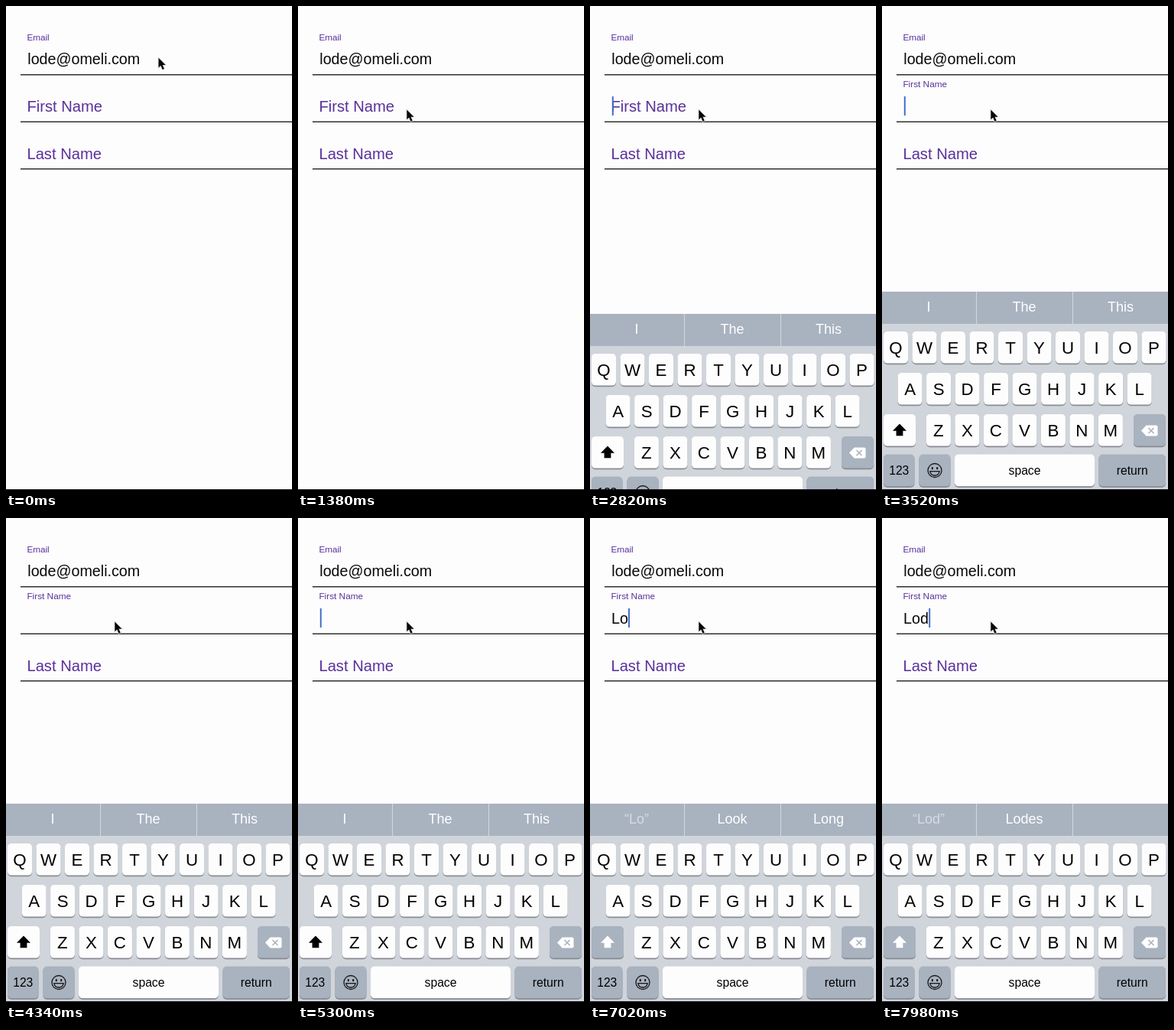
Write an HTML page that moves like this. It is 374 by 632 pixels and loops after 8 s.

```html
<!DOCTYPE html>
<html lang="en">
<head>
<meta charset="utf-8">
<title>Floating label form</title>
<style>
  html, body { margin: 0; width: 100%; height: 100%; overflow: hidden; background: #fdfdfd; }
  svg { display: block; width: 374px; height: 632px; font-family: "Liberation Sans", Arial, sans-serif; }
  .label { fill: #59309a; font-size: 20.2px; }
  .value { fill: #080808; font-size: 19.7px; }
  .rule { fill: #30302e; }
  .letter { font-size: 22.3px; text-anchor: middle; }
  .word { font-size: 15.7px; text-anchor: middle; }
  .hint { font-size: 18px; text-anchor: middle; fill: #fff; }
</style>
</head>
<body>
<svg id="stage" viewBox="0 0 374 632">
  <rect width="374" height="632" fill="#fdfdfd"/>
  <g id="form"></g>
  <text class="value" x="28.3" y="76">lode@omeli.com</text>
  <text class="value" id="typed" x="28" y="138"></text>
  <rect id="caret" y="118" width="2" height="25" fill="#466ecb"/>
  <g id="keyboard">
    <rect y="373" width="374" height="270" fill="#d0d4db"/>
    <rect y="373" width="374" height="42" fill="#a9b2bf"/>
    <path d="M123.5 373v42M249.5 373v42" stroke="#d3d8df"/>
    <g id="hints"></g>
    <g id="keys"></g>
    <path id="arrow" d="M23 545.5l9 9.3h-4.6v6.4h-8.8v-6.4h-4.6z"/>
    <path d="M339 554.5l6.5-7h13q2 0 2 2v10q0 2-2 2h-13z" fill="#fff"/>
    <path d="M348.5 551l7 7m0-7l-7 7" stroke="#a9b2bf" stroke-width="1.6"/>
    <g fill="none" stroke="#161616" stroke-width="1.3">
      <circle cx="69" cy="606.5" r="9"/>
      <path d="M62.8 607.6h12.4q-1 5.4-6.2 5.4t-6.2-5.4z"/>
      <path d="M65.8 603v1.2m6.4-1.2v1.2" stroke-width="2.2" stroke-linecap="round"/>
    </g>
  </g>
  <path id="pointer" d="M0 0v12.6l2.9-2.7 2.2 5.2 2.3-1-2.2-5h4z" fill="#080808"
        stroke="#e6e6e6" stroke-width="1.6" paint-order="stroke"/>
  <rect y="631" width="374" height="1" fill="#0c0c0c"/>
</svg>
<script>
const LOOP = 8000;
const $ = id => document.getElementById(id);

function add(parent, tag, attrs, text = '') {
  const el = document.createElementNS('http://www.w3.org/2000/svg', tag);
  for (const k in attrs) el.setAttribute(k, attrs[k]);
  el.textContent = text;
  parent.append(el);
  return el;
}

// Form fields
for (const y of [89, 150.5, 212]) add($('form'), 'rect', { class: 'rule', x: 19, y, width: 355, height: 1.5 });
const label = (text, transform) => add($('form'), 'text', { class: 'label', transform }, text);
label('Email', 'translate(27.4 44.8) scale(.58)');
const firstName = label('First Name', '');
label('Last Name', 'translate(27.4 199.5)');

// Keyboard
const WHITE = '#fdfdfd', GREY = '#a9b2bf';
function key(x, y, width, text, cls, fill = WHITE) {
  add($('keys'), 'rect', { x, y: y + 1.2, width, height: 42, rx: 5, fill: '#888c93' });
  const cap = add($('keys'), 'rect', { x, y, width, height: 41.6, rx: 5, fill });
  add($('keys'), 'text', { class: cls, x: x + width / 2, y: y + (cls === 'letter' ? 29.3 : 26) }, text);
  return cap;
}
[['QWERTYUIOP', 2], ['ASDFGHJKL', 20.6], ['ZXCVBNM', 57.9]].forEach(([row, x], r) =>
  [...row].forEach((c, i) => key(x + 37.5 * i, 425 + 54 * r, 32, c, 'letter')));
const shift = key(2, 533, 42, '', 'word');
key(329, 533, 42, '', 'word', GREY);
key(2, 585.5, 40.5, '123', 'word', GREY);
key(48.5, 585.5, 41, '', 'word', GREY);
key(95, 585.5, 183, 'space', 'word');
key(283.5, 585.5, 87.5, 'return', 'word', GREY);
const hints = [61, 186, 312].map(x => add($('hints'), 'text', { class: 'hint', x, y: 399 }));

// Each entry starts at its step
const typing = [[0, '', 28.8], [128, 'L', 38.8], [146, 'Lo', 50], [158, 'Lod', 61.2]];
const suggestions = [
  [0, 'I', 'The', 'This'],
  [130, '“L', 'oh', 'L ist'],
  [149, '“Lo”', 'Look', 'Long'],
  [162, '“Lod”', 'Lodes', '']
];

const current = (list, n) => list.filter(e => e[0] <= n).pop();
const clamp = v => Math.min(1, Math.max(0, v));
const smooth = v => (v = clamp(v)) * v * (3 - 2 * v);
const mix = (a, b, p) => a + (b - a) * p;

// Steps come in threes, held for 20, 100 and 20 ms
function stepAt(t) {
  const r = t % 140;
  return 3 * Math.floor(t / 140) + (r < 20 ? 0 : r < 120 ? 1 : 2);
}

function caretOpacity(n, start) {
  if (n < 50) return 0;
  const p = (n - start) % 24;
  return p < 22 ? clamp((18.5 - p) / 3.5) : (p - 21) / 3;
}

function draw(n) {
  const move = smooth((n - 1) / 20);
  $('pointer').setAttribute('transform', `translate(${mix(199.5, 142.3, move)} ${mix(67.8, 135.6, move)})`);

  // Critically damped rise
  const s = Math.max(0, n - 51.17) * 0.381;
  $('keyboard').setAttribute('transform', `translate(0 ${Math.round(259 * (1 + s) * Math.exp(-s))})`);

  const float = smooth((n - 62) / 7);
  firstName.setAttribute('transform',
    `translate(27.4 ${mix(138.2, 106.2, float)}) scale(${mix(1, 0.585, float)})`);

  const [start, text, x] = current(typing, n);
  $('typed').textContent = text;
  $('caret').setAttribute('x', x);
  $('caret').setAttribute('opacity', caretOpacity(n, start || 50));
  shift.setAttribute('fill', text ? GREY : WHITE);
  $('arrow').setAttribute('fill', text ? '#fff' : '#000');

  const words = current(suggestions, n).slice(1);
  hints.forEach((h, i) => h.textContent = words[i]);
  hints[0].style.fill = words[0][0] === '“' ? '#d6dbe2' : '';
}

const begin = performance.now();
function tick() {
  draw(stepAt((performance.now() - begin) % LOOP));
  requestAnimationFrame(tick);
}
tick();
</script>
</body>
</html>
```
